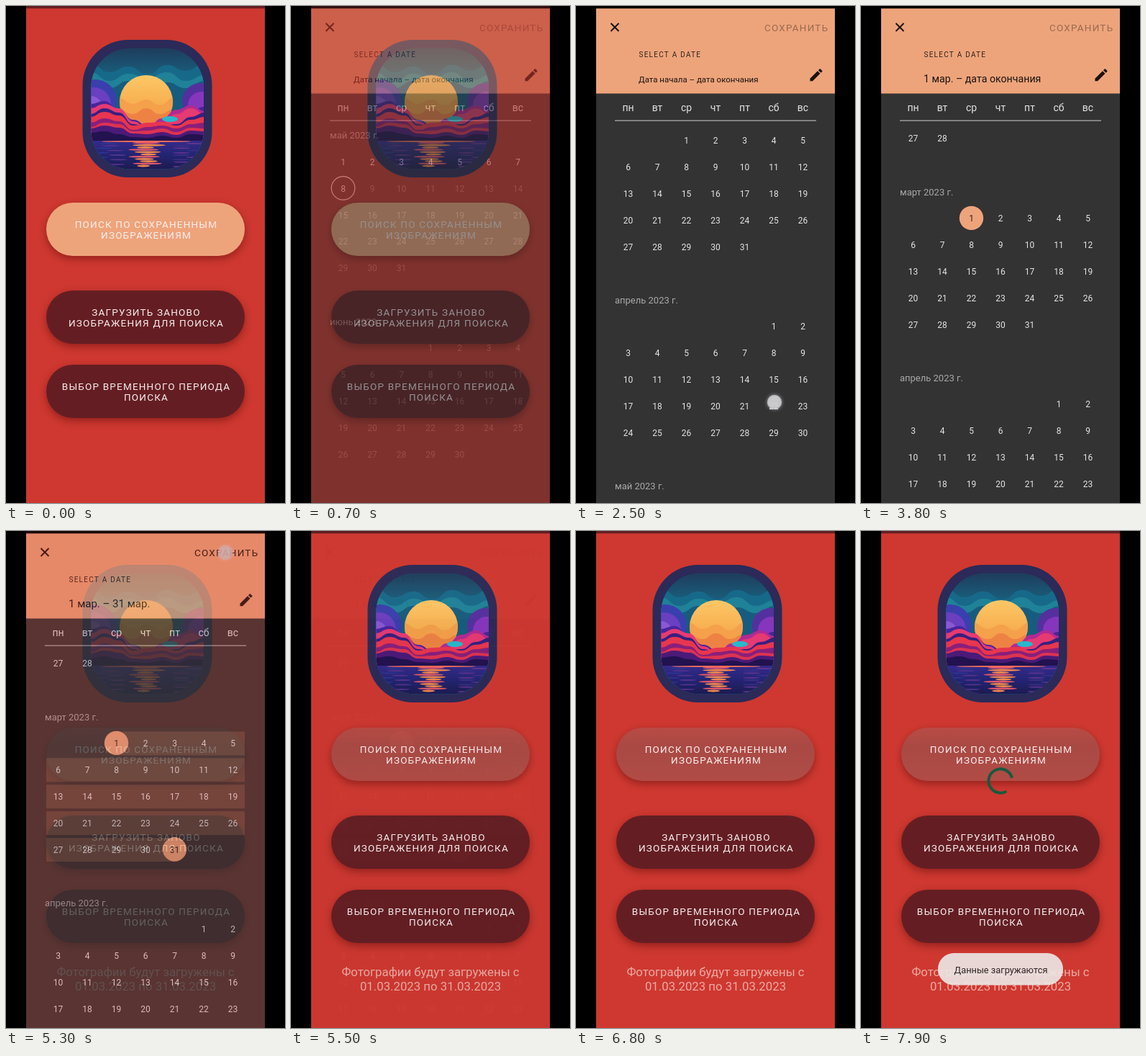
These frames come from a looping animation (388x690 px, 8 s). An HTML page with a canvas:

```html
<!DOCTYPE html>
<html lang="ru">
<head>
<meta charset="utf-8">
<style>
html, body { margin: 0; width: 100%; height: 100%; overflow: hidden; background: #000; }
canvas { position: absolute; left: 0; top: 0; }
</style>
</head>
<body>
<canvas id="home" width="388" height="690"></canvas>
<canvas id="picker" width="388" height="690"></canvas>
<script>
const LOOP = 8000, FRAME = 100;
const RED = '#ce3830', MAROON = '#641e23', PEACH = '#eea47b', DARK = '#333333';
const picker = document.getElementById('picker');
const home = document.getElementById('home').getContext('2d');
const cal = picker.getContext('2d');

const clamp = v => Math.max(0, Math.min(1, v));
const phase = (t, a, b) => clamp((t - a) / (b - a));
const easeOut = p => 1 - (1 - p) ** 3;
const easeInOut = p => p * p * (3 - 2 * p);

// y is the middle of the capitals
function text(c, str, x, y, size, color, { align = 'left', weight = 400, spacing = 0 } = {}) {
  c.font = `${weight} ${size}px Roboto, sans-serif`;
  c.letterSpacing = spacing + 'px';
  c.textAlign = align;
  c.fillStyle = color;
  c.fillText(str, x, y + size * 0.355);
}

function box(c, x, y, w, h, r, color) {
  c.beginPath();
  c.roundRect(x, y, w, h, r);
  c.fillStyle = color;
  c.fill();
}

function disc(c, x, y, r, color, ry = r) {
  c.beginPath();
  c.ellipse(x, y, r, ry, 0, 0, 7);
  c.fillStyle = color;
  c.fill();
}

function gradient(c, y0, y1, ...colors) {
  const g = c.createLinearGradient(0, y0, 0, y1);
  colors.forEach((color, i) => g.addColorStop(i / (colors.length - 1), color));
  return g;
}

// Smooth ridge through evenly spaced heights, filled down to the shore
function ridge(c, color, heights, x0 = 117, x1 = 277) {
  const step = (x1 - x0) / (heights.length - 1);
  c.beginPath();
  c.moveTo(x0, 188);
  c.lineTo(x0, heights[0]);
  for (let i = 1; i < heights.length; i++) {
    const x = x0 + i * step, mid = x - step / 2;
    c.bezierCurveTo(mid, heights[i - 1], mid, heights[i], x, heights[i]);
  }
  c.lineTo(x1, 188);
  c.fillStyle = color;
  c.fill();
}

function landscape(c) {
  box(c, 106.5, 47, 180, 191, 63, '#2b2a58');
  c.save();
  c.beginPath();
  c.roundRect(118.5, 58.5, 156.5, 168, 54);
  c.clip();
  c.fillStyle = gradient(c, 58, 150, '#1f3c5c', '#176683', '#1c8499');
  c.fillRect(117, 57, 160, 171);
  ridge(c, '#17698a', [80, 92, 84, 95, 82, 90, 80]);
  ridge(c, '#1f8298', [92, 104, 94, 100, 92, 104, 96]);
  ridge(c, '#175c7e', [106, 114, 104, 108, 106, 114, 104]);

  disc(c, 124, 132, 30, '#3a3fae');
  disc(c, 122, 137, 24, '#6a3fc0');
  disc(c, 118, 141, 16, '#8a58d4');
  disc(c, 270, 132, 25, '#54309f');
  disc(c, 272, 138, 19, '#8636bd');

  disc(c, 195, 133, 37, gradient(c, 96, 170, '#fcc766', '#f8b152', '#f08048'));
  c.save();
  c.beginPath();
  c.arc(195, 133, 37, 0, 7);
  c.clip();
  ridge(c, '#f5a04a', [128, 136, 130, 138, 128], 157, 233);
  ridge(c, '#ee8244', [144, 150, 142, 150, 144], 157, 233);
  c.restore();

  ridge(c, '#4a249a', [136, 132, 144, 158, 166, 160, 150, 144, 140]);
  ridge(c, '#b02a94', [150, 146, 152, 164, 168, 156, 144, 138, 146]);
  ridge(c, '#e63a72', [142, 136, 142, 160, 170, 162, 150, 142, 150]);
  disc(c, 228, 157, 11, '#27bacb', 4);
  ridge(c, '#38207f', [150, 142, 148, 164, 170, 166, 164, 154, 148]);
  ridge(c, '#e8364f', [154, 147, 152, 166, 162, 161, 166, 158, 154]);
  ridge(c, '#8a1f7a', [162, 156, 160, 172, 168, 166, 170, 164, 162]);
  ridge(c, '#dc3352', [168, 162, 164, 174, 173, 170, 175, 169, 170]);
  ridge(c, '#4c1a78', [170, 166, 169, 177, 178, 175, 179, 173, 174]);
  ridge(c, '#22124f', [176, 174, 178, 182, 183, 180, 183, 178, 179]);

  c.fillStyle = gradient(c, 187, 226, '#352a8c', '#232473', '#1d1b52');
  c.fillRect(117, 187, 160, 41);
  disc(c, 195, 188, 62, '#ef6c58', 1);
  for (let i = 0; i < 11; i++) {
    const y = 190 + i * 3.2, w = 19 + 6 * Math.sin(i * 2.3) - i * 0.5;
    disc(c, 195 + 4 * Math.sin(i * 1.7), y, w, i % 3 ? '#f28a50' : '#e0586a', 1.4);
    disc(c, 143 + 13 * Math.sin(i * 2.9), y + 1, 12, i % 2 ? '#55338f' : '#2f3590', 0.9);
    disc(c, 250 + 12 * Math.cos(i * 2.1), y + 1, 12, i % 2 ? '#3b2f86' : '#61358f', 0.9);
  }
  c.restore();
}

function button(c, y, color, lines) {
  c.save();
  c.shadowColor = 'rgba(70,0,0,.42)';
  c.shadowBlur = 11;
  c.shadowOffsetY = 4;
  box(c, 56, y, 276, 74, 37, color);
  c.restore();
  lines.forEach((line, i) =>
    text(c, line, 195, y + 30 + i * 15, 13.5, '#f8eeee', { align: 'center', spacing: 1.2 }));
}

function touch(c, x, y, alpha) {
  if (alpha <= 0) return;
  c.save();
  c.globalAlpha = alpha;
  c.shadowColor = 'rgba(235,235,255,.7)';
  c.shadowBlur = 5;
  disc(c, x, y, 10, 'rgba(205,205,205,.88)');
  c.restore();
}

// Visible between a and b, fading over the last stretch
const tap = (t, a, b) => t < a || t >= b ? 0 : 0.85 * (1 - phase(t, a + 100, b));

function spinner(c, t) {
  if (t < 7300) return;
  const rad = Math.PI / 180;
  const tail = 60 + (t - 7900) * 0.23;
  const sweep = 20 + 265 * easeInOut(phase(t, 7250, 7900));
  c.beginPath();
  c.arc(194, 347, 16.6, tail * rad, (tail + sweep) * rad);
  c.lineWidth = 4;
  c.strokeStyle = '#17593f';
  c.stroke();
}

function toast(c, t) {
  const alpha = phase(t, 7500, 7800);
  if (!alpha) return;
  c.save();
  c.globalAlpha = alpha;
  box(c, 107, 586, 174, 44.5, 22, 'rgba(236,229,227,.92)');
  text(c, 'Данные загружаются', 194.5, 609.5, 12.8, '#2e2424', { align: 'center' });
  c.restore();
}

function drawHome(c, t, dim) {
  c.fillStyle = '#000';
  c.fillRect(0, 0, 388, 690);
  c.fillStyle = RED;
  c.fillRect(28, 0, 332, 690);
  c.fillStyle = MAROON;
  c.fillRect(28, 0, 332, 3.4);
  landscape(c);
  const first = t < 3000 ? PEACH : gradient(c, 273, 347, '#b94b45', '#aa4944', '#ac4b46', '#b14b45');
  button(c, 273, first, ['ПОИСК ПО СОХРАНЕННЫМ', 'ИЗОБРАЖЕНИЯМ']);
  button(c, 395, MAROON, ['ЗАГРУЗИТЬ ЗАНОВО', 'ИЗОБРАЖЕНИЯ ДЛЯ ПОИСКА']);
  button(c, 498, MAROON, ['ВЫБОР ВРЕМЕННОГО ПЕРИОДА', 'ПОИСКА']);
  if (t > 3000) {
    const note = { align: 'center' };
    text(c, 'Фотографии будут загружены с', 194, 612.5, 16.8, '#eba9a3', note);
    text(c, '01.03.2023 по 31.03.2023', 194, 632, 16.8, '#eba9a3', note);
  }
  touch(c, 309, 532, tap(t, 200, 400));
  touch(c, 296, 440, tap(t, 7100, 7300));
  spinner(c, t);
  toast(c, t);
  if (dim) {
    c.fillStyle = `rgba(0,0,0,${dim})`;
    c.fillRect(28, 0, 332, 690);
  }
}

const MONTHS = ['январь', 'февраль', 'март', 'апрель', 'май', 'июнь', 'июль'];
const DAYS = ['пн', 'вт', 'ср', 'чт', 'пт', 'сб', 'вс'];
const ROW = 36.9, MONTH_H = ROW * 7;
const colX = i => 72.5 + i * 40.5;

// y of the March title
function scrollAt(t) {
  if (t <= 1700) return -337 + 233 * phase(t, 1300, 1700) ** 1.3;
  if (t <= 2200) return -104 + 124 * easeOut(phase(t, 1700, 2200));
  if (t <= 2500) return 20 + 130 * phase(t, 2200, 2500) ** 1.2;
  return 150 + 108 * easeOut(phase(t, 2500, 3000));
}

function drawMonth(c, m, top, t) {
  text(c, `${MONTHS[m]} 2023 г.`, 54, top, 13, '#a9a9a9');
  const lead = (new Date(2023, m, 1).getDay() + 6) % 7;
  const count = new Date(2023, m + 1, 0).getDate();
  const ranged = m === 2 && t >= 4100;
  const rowY = r => top + ROW * (r + 1);
  if (ranged) {
    for (let r = 0; r < 5; r++) {
      const from = r ? 56 : colX(2), to = r < 4 ? 332 : colX(4);
      c.fillStyle = '#58493f';
      c.fillRect(from, rowY(r) - 16.5, to - from, 33);
    }
  }
  for (let d = 1; d <= count; d++) {
    const i = lead + d - 1, x = colX(i % 7), y = rowY(Math.floor(i / 7));
    const picked = m === 2 && (d === 1 && t >= 3200 || d === 31 && ranged);
    const future = m > 4 || m === 4 && d > 8;
    if (picked) disc(c, x, y - 0.5, 16.7, PEACH);
    if (m === 4 && d === 8) {
      c.beginPath();
      c.arc(x, y - 0.5, 16.3, 0, 7);
      c.lineWidth = 1.2;
      c.strokeStyle = '#e6e6e6';
      c.stroke();
    }
    text(c, d, x, y, 12, picked ? '#2b211c' : future ? '#747474' : '#e4e4e4', { align: 'center' });
  }
}

const PENCIL = new Path2D('M3 17.25V21h3.75L17.81 9.94l-3.75-3.75L3 17.25zM20.71 7.04a1 1 0 0 0 0-1.41l-2.34-2.34a1 1 0 0 0-1.41 0l-1.83 1.83 3.75 3.75 1.83-1.83z');

function drawHeader(c, t) {
  c.fillStyle = PEACH;
  c.fillRect(28, 3.5, 332, 118);
  c.lineWidth = 2;
  c.strokeStyle = '#17110e';
  c.beginPath();
  c.moveTo(48.5, 24); c.lineTo(59.5, 35);
  c.moveTo(59.5, 24); c.lineTo(48.5, 35);
  c.stroke();
  text(c, 'СОХРАНИТЬ', 262, 30, 13.5, t < 4100 ? '#9a6a51' : '#1b1310', { spacing: 1.2 });
  text(c, 'SELECT A DATE', 87.5, 67, 10, '#33231b', { spacing: 1.25 });
  const [label, size] = t < 3200 ? ['Дата начала – дата окончания', 11.5]
    : t < 4100 ? ['1 мар. – дата окончания', 14.2] : ['1 мар. – 31 мар.', 15];
  text(c, label, 87, t < 3200 ? 101.5 : 100.5, size, '#1b1310');
  c.save();
  c.translate(322.6, 84.4);
  c.scale(0.95, 0.95);
  c.fillStyle = '#1b1310';
  c.fill(PENCIL);
  c.restore();
}

function drawPicker(c, t) {
  c.fillStyle = '#000';
  c.fillRect(28, 0, 332, 690);
  c.fillStyle = DARK;
  c.fillRect(28, 3.5, 332, 687);
  drawHeader(c, t);
  DAYS.forEach((day, i) => text(c, day, colX(i), 141, 14, '#e2e2e2', { align: 'center' }));
  c.fillStyle = '#b5b5b5';
  c.fillRect(54, 158.5, 280, 1.2);

  c.save();
  c.beginPath();
  c.rect(28, 160, 332, 530);
  c.clip();
  const scroll = scrollAt(t);
  MONTHS.forEach((_, m) => {
    const top = scroll + (m - 2) * MONTH_H;
    if (top > -MONTH_H && top < 710) drawMonth(c, m, top, t);
  });
  c.restore();

  if (t >= 1400 && t <= 1700) touch(c, 276, 597 + scroll + 104, 1);
  if (t >= 2300 && t <= 2500) touch(c, 276, 400 + scroll, 1);
  touch(c, colX(2), 294, tap(t, 3200, 3400));
  touch(c, colX(4), 442, tap(t, 4100, 4300));
  touch(c, 305, 30, tap(t, 5200, 5400));
}

function pickerAlpha(t) {
  if (t < 3000) return t < 600 ? 0 : [0.12, 0.41, 0.8][(t - 600) / FRAME] ?? 1;
  return t < 5300 ? 1 : [0.75, 0.3, 0.02][(t - 5300) / FRAME] ?? 0;
}

function render(now) {
  const t = Math.floor((now % LOOP) / FRAME) * FRAME;
  const alpha = pickerAlpha(t);
  picker.style.opacity = alpha;
  if (alpha < 1) drawHome(home, t, t < 3000 ? alpha * 0.29 : 0);
  if (alpha > 0) drawPicker(cal, t);
}

const start = performance.now();
function tick() {
  render(performance.now() - start);
  requestAnimationFrame(tick);
}
tick();
</script>
</body>
</html>
```
